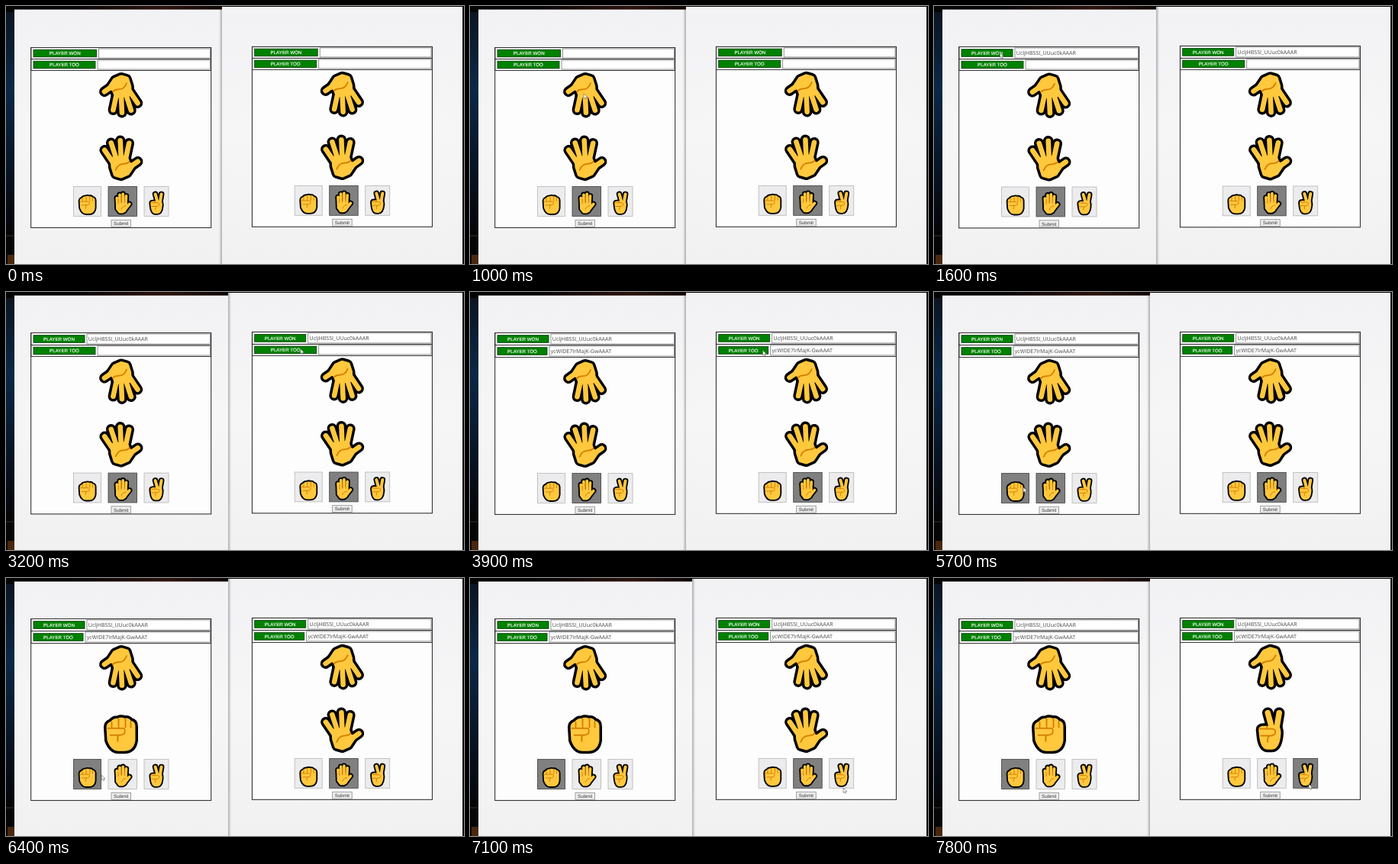
Write an HTML page that moves like this. It is 600 px wide and 338 px high and loops after 8 s.

```html
<!DOCTYPE html>
<html lang="en">
<head>
<meta charset="utf-8">
<title>Rock paper scissors</title>
<style>
  html, body { margin: 0; width: 100%; height: 100%; overflow: hidden; background: #050506; }
  svg { display: block; width: 100vw; height: 100vh; }
  text { text-rendering: geometricPrecision; }
  .label { font: 6.2px "Liberation Sans", Arial, sans-serif; fill: #fff; stroke: #fff; stroke-width: .16; text-anchor: middle; }
  .submit { font: 6.2px "Liberation Sans", Arial, sans-serif; fill: #333; text-anchor: middle; }
  .id { font: 7.06px "Open Sans", "Noto Sans", sans-serif; fill: #484848; }
  .ink { fill: #000; stroke: #000; stroke-linecap: round; stroke-linejoin: round; }
  .skin { fill: #ffc83d; stroke: #ffc83d; stroke-linecap: round; stroke-linejoin: round; }
  .crease { fill: none; stroke: #d67d00; stroke-width: 1.8; stroke-linecap: round; stroke-linejoin: round; }
</style>
</head>
<body>
<svg viewBox="0 0 600 338" preserveAspectRatio="none">
  <defs>
    <linearGradient id="page" x2="0" y2="1">
      <stop offset="0" stop-color="#f2f1f3"/>
      <stop offset=".5" stop-color="#f6f6f7"/>
      <stop offset="1" stop-color="#f1f1f2"/>
    </linearGradient>
    <linearGradient id="blue" x2="0" y2="1">
      <stop offset="0" stop-color="#0a1522"/>
      <stop offset=".35" stop-color="#0b2845"/>
      <stop offset=".6" stop-color="#081b30"/>
      <stop offset="1" stop-color="#040508"/>
    </linearGradient>
    <linearGradient id="ember">
      <stop offset="0" stop-color="#070506"/>
      <stop offset=".6" stop-color="#2a110c"/>
      <stop offset="1" stop-color="#0c0606"/>
    </linearGradient>
    <linearGradient id="shade">
      <stop offset="0" stop-color="#000" stop-opacity="0"/>
      <stop offset="1" stop-color="#000" stop-opacity=".28"/>
    </linearGradient>
    <g id="icons"></g>
  </defs>
  <rect width="600" height="338" fill="#050506"/>
  <rect y="8" width="11" height="285" fill="url(#blue)"/>
  <rect x="90" width="200" height="5" fill="url(#ember)"/>
  <rect y="300" width="11" height="2" fill="#1c1c20"/>
  <rect x="2" y="326" width="9" height="12" fill="#4a280e"/>
  <g id="scene"></g>
  <path id="cursor" d="M0 0V8L1.9 6.3L3.2 9L4.6 8.4L3.4 5.8H6Z" fill="#fff" stroke="#555" stroke-width=".7"/>
</svg>
<script>
const LOOP = 8000;
const $ = id => document.getElementById(id);
const IDS = ["UcljHBSSI_UUuc0kAAAR", "ycWIDE7IrMajK-GwAAAT"];
const LABELS = ["PLAYER WON", "PLAYER TOO"];

// Times of clicks and their results
const T = { join1: 1300, join2: 3300, press1: 5500, pick1: 5800, press2: 7400, pick2: 7500 };

// Cursor stops: time, x, y
const PATH = [
  [700, 190, 150], [1400, 86.5, 61.5], [1850, 86.5, 61.5], [2550, 380, 82], [2800, 386, 74],
  [3600, 385.5, 75], [3850, 385.5, 75], [4700, 198, 221], [5400, 117, 256],
  [6350, 117, 256], [6750, 300, 306], [7100, 489, 275], [7400, 491, 270], [8000, 491, 270]
];

// Each shape: body and finger paths, their stroke widths, creases
const SHAPES = {
  open: {
    body: "M-10.5 2L6 0L9 8L14 11L8 20L0 23.5L-7 21.5L-10 12Z",
    fingers: "M-21.5-10L-10 7M-13-19.5L-6 2M-1-22.5L0 0M10.5-19L6 2M22 5L9 14",
    w: 6.6, bw: 6.6,
    lines: "M-7 16Q-4 8 3 8Q8 8 11 5"
  },
  palm: {
    body: "M-13 4L8 0L9 12L5 19L0 22L-7 22L-13 14Z",
    fingers: "M-14-12L-13 5M-7-20L-7 0M1-22L1 0M9-17L8 0M17 3L8 14",
    w: 7, bw: 7,
    lines: "M-10.5-9V2M-3-16V0M5-15V0M-3 16Q-1 8 8 7"
  },
  fist: {
    body: "M-19-9Q-19-15-13-17Q-10-21-4-21Q0-23 5-21Q10-22 13-18Q19-17 19-10V8Q17 22 4 22H-3Q-13 22-18 8Z",
    fingers: "", w: 0, bw: 0,
    lines: "M-12-16V-9M-3-20V-9M6-20V-9M13-17V-9M-17-8H3Q6-7 5-2Q4 1-3 1H-14M-3 1Q-5 4-4 9"
  },
  scissors: {
    body: "M-15 0Q-15-5-8-5H12Q15 0 14 8Q12 26 2 26H-4Q-12 25-14 10Z",
    fingers: "M-3-22L3 0M12-22L8 2",
    w: 7.5, bw: 0,
    lines: "M-13-1H3Q8 0 7 4Q6 8-1 8H-12M-4-1V-4M-1 8Q-4 11-3 16"
  }
};

$("icons").innerHTML = Object.entries(SHAPES).map(([name, s]) => {
  const layer = (cls, extra) =>
    `<g class="${cls}"><path d="${s.fingers}" stroke-width="${s.w + extra}"/>` +
    `<path d="${s.body}" stroke-width="${s.bw + extra}"/></g>`;
  return `<g id="${name}">${layer("ink", 7)}${layer("skin", 0)}<path class="crease" d="${s.lines}"/></g>`;
}).join("");

const box = (x, y, w, h, fill, stroke, sw = 1) =>
  `<rect x="${x}" y="${y}" width="${w}" height="${h}" fill="${fill}" stroke="${stroke}" stroke-width="${sw}"/>`;
const icon = (name, x, y, k = 1, turn = 0) =>
  `<use href="#${name}" transform="translate(${x} ${y}) rotate(${turn}) scale(${k})"/>`;

function row(i, y, h, filled) {
  const end = [filled ? 103 : 118.5, filled ? 101 : 117][i];
  const field = end + 3, mid = y + h / 2;
  return box(33, y, 235.5, h, "#fff", "#222", .9) +
    box(field, y + 1.5, 267.3 - field, h - 3, "#fff", "#777", .8) +
    box(36, mid - 4.8, end - 36, 9.6, "#008200", "#0b3d0d", .9) +
    `<text class="label" x="${(36 + end) / 2}" y="${mid + 2.2}">${LABELS[i]}</text>` +
    (filled ? `<text class="id" x="${field + 1.8}" y="${mid + 2.9}">${IDS[i]}</text>` : "");
}

function board(x, y, joined, hand, chosen) {
  const split = 69.5, d = joined / 2;
  const [h1, h2] = [0, 1].map(i => joined > i ? 16 : 15);
  const top = split - h1;
  const choices = [["fist", 88.5, 36, 106.6, 260.4], ["palm", 134, 37.5, 152.7, 257.9], ["scissors", 181, 32, 197.2, 258.2]];
  const centers = { open: [150.7, 198.8], fist: [150.5, 203.8], scissors: [150.5, 198.8] };
  const [hx, hy] = centers[hand];
  return `<g transform="translate(${x} ${y})">` +
    box(32.7, top, 236, 290.4 + d - top, "#fdfdfe", "#222") +
    row(0, top, h1, joined > 0) + row(1, split, h2, joined > 1) +
    icon("open", 150.9, 117.2 + d, 1, 180) + icon(hand, hx, hy + d) +
    choices.map(([name, bx, w, ix, iy]) => {
      const on = chosen.includes(name);
      return box(bx, 236.6 + d, w, 38.8, on ? "#808080" : "#ececee", on ? "#4a4a4a" : "#bcbcbc", .9) +
        icon(name, ix, iy + d, .53);
    }).join("") +
    box(138, 280.3 + d, 25.5, 9, "#efefef", "#888", .8) +
    `<text class="submit" x="150.7" y="${287 + d}">Submit</text></g>`;
}

function scene(joined, leftFront, left, right) {
  const edge = leftFront ? 291 : 283;
  const shadow = leftFront
    ? `<rect x="-295" y="-338" width="4" height="338" transform="rotate(180)" fill="url(#shade)"/>`
    : `<rect x="279" y="4.6" width="4" height="334" fill="url(#shade)"/>`;
  return `<rect x="11" y="4.6" width="${edge - 11}" height="334" fill="url(#page)"/>` +
    `<rect x="${edge}" y="1" width="${598 - edge}" height="337" fill="url(#page)"/>` + shadow +
    board(0, 0, joined, ...left) + board(289.7, -1.1, joined, ...right);
}

function choice(t, press, pick, name) {
  if (t < press) return ["open", ["palm"]];
  if (t < pick) return ["open", ["palm", name]];
  return [name, [name]];
}

function place(t) {
  const i = Math.max(1, PATH.findIndex(p => p[0] > t));
  const [t0, x0, y0] = PATH[i - 1], [t1, x1, y1] = PATH[i];
  const p = Math.min(1, Math.max(0, (t - t0) / (t1 - t0)));
  const e = p * p * (3 - 2 * p);
  return [x0 + (x1 - x0) * e, y0 + (y1 - y0) * e];
}

let last = "";
function draw() {
  const t = performance.now() % LOOP;
  const joined = (t >= T.join1) + (t >= T.join2);
  const leftFront = (t >= T.join1 && t < T.join2) || (t >= T.pick1 && t < T.pick2);
  const state = [joined, leftFront,
    choice(t, T.press1, T.pick1, "fist"), choice(t, T.press2, T.pick2, "scissors")];
  const key = JSON.stringify(state);
  if (key !== last) {
    last = key;
    $("scene").innerHTML = scene(...state);
  }
  const [x, y] = place(t);
  $("cursor").setAttribute("transform", `translate(${x} ${y}) scale(.8)`);
  $("cursor").style.display = t < PATH[0][0] ? "none" : "";
  requestAnimationFrame(draw);
}
draw();
</script>
</body>
</html>
```
